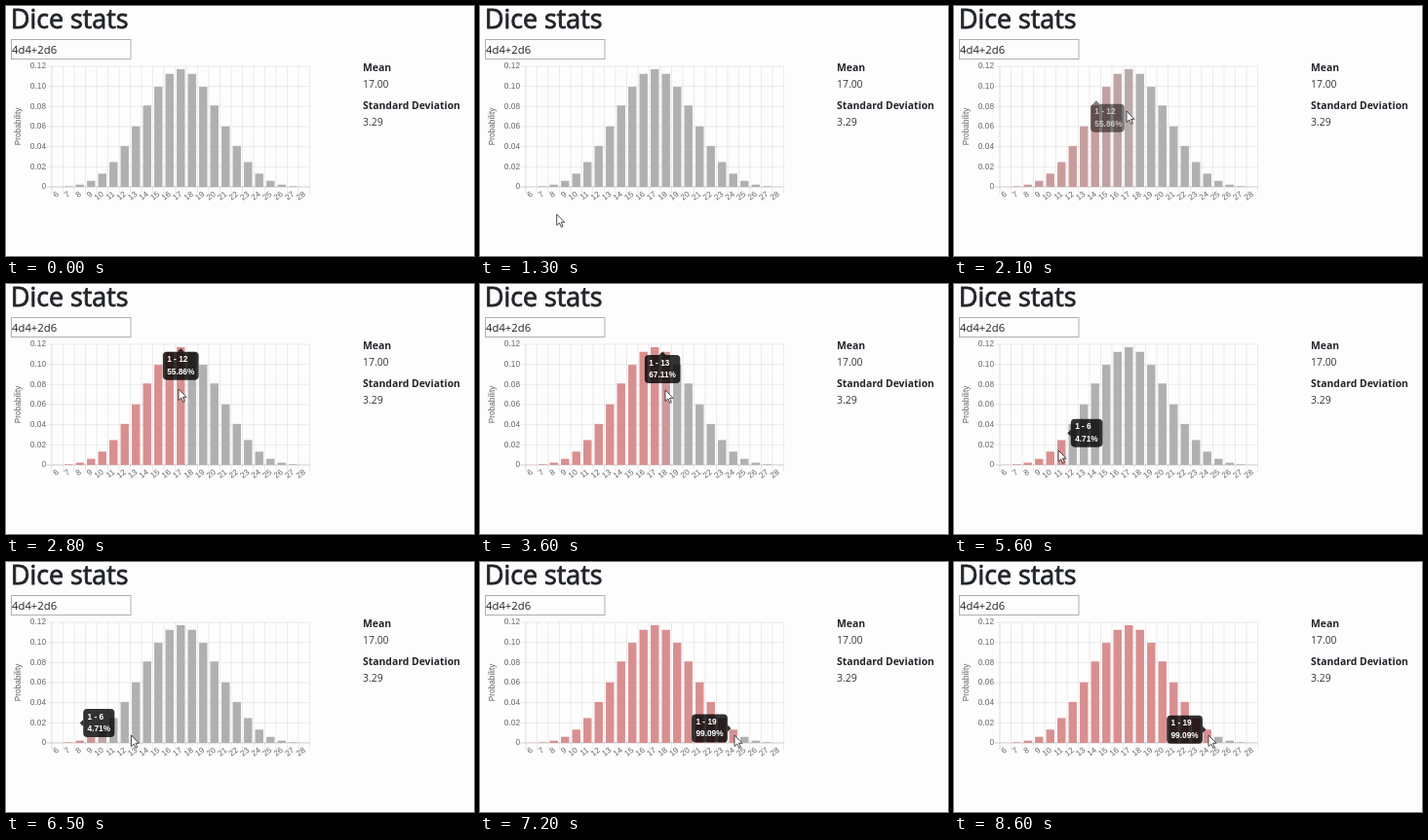
Write an HTML page with a canvas that moves like this. It is 480 px wide and 257 px high and loops after 9.1 s.

```html
<!DOCTYPE html>
<html lang="en">
<head>
<meta charset="utf-8">
<title>Dice stats</title>
<style>
  html, body { margin: 0; width: 100%; height: 100%; overflow: hidden; background: #fefdfe; }
  canvas { display: block; }
</style>
</head>
<body>
<canvas id="stage" width="480" height="257"></canvas>
<script>
const ctx = document.getElementById('stage').getContext('2d');

const LOOP = 9100, TICK = 100, LAST_TICK = 8600;
const HOVER_MS = 400, HOVER_LAG = 70, HOVER_STEP = 20;
const UI = '"Open Sans", "Noto Sans", sans-serif';
const CHART = '"Liberation Sans", Arial, sans-serif';
const LABEL_SIZE = 8.3;

const plot = { left: 47, right: 311.5, top: 62, bottom: 186, max: 0.12 };
const canvasArea = { left: 5, right: 314, top: 56, bottom: 203 };
const tip = { height: 29, pad: 4.3, radius: 4.1, caret: 3.5, gap: 4.8 };

// Probability of every total of 4d4+2d6, from 6 to 28.
const dice = [4, 4, 4, 4, 6, 6];
const probs = dice.reduce((dist, sides) => {
  const next = Array(dist.length + sides - 1).fill(0);
  dist.forEach((p, i) => { for (let k = 0; k < sides; k++) next[i + k] += p / sides; });
  return next;
}, [1]);
const slot = (plot.right - plot.left) / probs.length;
const barX = i => plot.left + (i + 0.5) * slot;
const valueY = v => plot.bottom - v / plot.max * (plot.bottom - plot.top);

// Pointer stops: time, x, y.
const pointerPath = [
  [400, 484, 258], [1000, 80, 214], [1500, 78, 214], [1895, 95, 215],
  [1975, 161, 104], [2000, 176, 107], [2100, 177, 108], [3320, 177, 108],
  [3480, 190, 109], [4300, 190, 109], [4650, 165, 109], [4800, 165, 109],
  [5000, 149, 112], [5600, 107, 171], [5900, 77, 176], [6250, 79, 178],
  [6980, 261, 178]
];

const mix = (a, b, k) => a + (b - a) * k;
const smooth = k => k * k * (3 - 2 * k);
const easeOutQuart = k => 1 - (1 - Math.min(k, 1)) ** 4;

function pointerAt(t) {
  const n = pointerPath.findIndex(p => p[0] > t);
  if (n === 0) return [-50, -50];
  if (n < 0) return pointerPath[pointerPath.length - 1].slice(1);
  const [t0, x0, y0] = pointerPath[n - 1], [t1, x1, y1] = pointerPath[n];
  const k = smooth((t - t0) / (t1 - t0));
  return [mix(x0, x1, k), mix(y0, y1, k)];
}

function hoveredBar(t) {
  const [x, y] = pointerAt(t), a = canvasArea;
  if (x < a.left || x > a.right || y < a.top || y > a.bottom) return -1;
  return Math.max(0, Math.min(probs.length - 1, Math.floor((x - plot.left) / slot)));
}

function tipInfo(i) {
  const sum = probs.slice(0, i + 1).reduce((a, b) => a + b, 0);
  const x = barX(i), y = valueY(probs[i]);
  let side = x <= (canvasArea.left + canvasArea.right) / 2 ? 'left' : 'right';
  if (y < canvasArea.top + tip.height) side = 'top';
  if (y > canvasArea.bottom - tip.height) side = 'bottom';
  return { x, y, side, title: `1 - ${i + 1}`, body: (sum * 100).toFixed(2) + '%' };
}

// Animated values: box x, box y, width, caret x, opacity, then redness per bar.
function hoverTarget(i) {
  const { x, y, side, body } = tipInfo(i);
  ctx.font = `bold ${LABEL_SIZE}px ${CHART}`;
  const w = ctx.measureText(body).width + 2 * tip.pad;
  const boxX = { left: x + tip.gap, right: x - tip.gap - w }[side] ?? x - w / 2;
  const boxY = { top: y + tip.gap, bottom: y - tip.gap - tip.height }[side] ?? y - tip.height / 2;
  return [boxX, boxY, w, x, 1, ...probs.map((_, k) => k <= i ? 1 : 0)];
}

// Each newly hovered bar restarts the transition from the current view;
// bars that drop out of the range turn grey at once.
function hoverAt(t) {
  let active = -1, from = null, to = null, start = 0;
  const view = s => from.map((v, k) => mix(v, to[k], easeOutQuart((s - start) / HOVER_MS)));
  for (let s = 0; s <= t; s += HOVER_STEP) {
    const i = hoveredBar(s - HOVER_LAG);
    if (i < 0 || i === active) continue;
    const target = hoverTarget(i);
    from = from
      ? view(s).map((v, k) => k < 5 ? v : v * target[k])
      : target.map((v, k) => k < 4 ? v : 0);
    to = target;
    active = i;
    start = s;
  }
  return { active, view: from && view(t) };
}

function text(str, x, y, font, color, align = 'left', baseline = 'alphabetic') {
  ctx.font = font;
  ctx.fillStyle = color;
  ctx.textAlign = align;
  ctx.textBaseline = baseline;
  ctx.fillText(str, x, y);
}

function rotatedText(str, x, y, angle, align) {
  ctx.save();
  ctx.translate(x, y);
  ctx.rotate(angle);
  text(str, 0, 0, `${LABEL_SIZE}px ${CHART}`, '#666', align, 'middle');
  ctx.restore();
}

function line(x0, y0, x1, y1, alpha) {
  ctx.strokeStyle = `rgba(0,0,0,${alpha})`;
  ctx.lineWidth = 0.7;
  ctx.beginPath();
  ctx.moveTo(x0, y0);
  ctx.lineTo(x1, y1);
  ctx.stroke();
}

function drawPage() {
  ctx.fillStyle = '#fefdfe';
  ctx.fillRect(0, 0, 480, 257);

  // A thin outline gives the heading its medium weight.
  text('Dice stats', 5, 22.8, `26.8px ${UI}`, '#212529');
  ctx.strokeStyle = '#212529';
  ctx.lineWidth = 0.8;
  ctx.strokeText('Dice stats', 5, 22.8);

  ctx.strokeStyle = '#b0adb4';
  ctx.lineWidth = 1;
  ctx.strokeRect(5.5, 34.5, 122.5, 20);
  text('4d4+2d6', 6, 48.8, `11.3px ${UI}`, '#222');
  [['Mean', '17.00', 67], ['Standard Deviation', '3.29', 106]].forEach(([name, value, y]) => {
    text(name, 366, y, `bold 10.4px ${UI}`, '#212529');
    text(value, 366, y + 17, `10.4px ${UI}`, '#33373b');
  });
}

function drawAxes() {
  for (let k = 0; k <= 6; k++) {
    const v = k * 0.02, y = valueY(v);
    line(41.5, y, plot.right, y, k ? 0.1 : 0.25);
    const label = k === 0 ? '0' : v.toFixed(2);
    text(label, 41, y, `${LABEL_SIZE}px ${CHART}`, '#666', 'right', 'middle');
  }
  for (let k = 0; k <= probs.length; k++) {
    const x = plot.left + k * slot;
    line(x, plot.top, x, plot.bottom + 7, k ? 0.1 : 0.18);
  }
  probs.forEach((_, i) => rotatedText(i + dice.length, barX(i) + 0.5, 192.5, -0.66, 'right'));
  rotatedText('Probability', 12.5, 124, -Math.PI / 2, 'center');
}

function drawBars(redness) {
  const w = slot * 0.73;
  probs.forEach((p, i) => {
    const k = redness ? redness[i] : 0;
    const gb = mix(176, 143, k);
    ctx.fillStyle = `rgb(${mix(177, 217, k)},${gb},${gb})`;
    ctx.fillRect(barX(i) - w / 2, valueY(p), w, plot.bottom - valueY(p));
  });
}

function drawTip(active, [x, y, w, caretX, opacity]) {
  const { side, title, body } = tipInfo(active);
  const { height: h, caret: c } = tip;
  const midY = y + h / 2;
  const carets = {
    left: [[x, midY - c], [x - c, midY], [x, midY + c]],
    right: [[x + w, midY - c], [x + w + c, midY], [x + w, midY + c]],
    top: [[caretX - c, y], [caretX, y - c], [caretX + c, y]],
    bottom: [[caretX - c, y + h], [caretX, y + h + c], [caretX + c, y + h]]
  };
  ctx.save();
  ctx.globalAlpha = opacity;
  ctx.fillStyle = 'rgba(0,0,0,0.8)';
  ctx.beginPath();
  ctx.roundRect(x, y, w, h, tip.radius);
  ctx.fill();
  ctx.beginPath();
  carets[side].forEach(p => ctx.lineTo(...p));
  ctx.fill();
  const font = `bold ${LABEL_SIZE}px ${CHART}`;
  text(title, x + tip.pad, y + 8.3, font, '#fff', 'left', 'middle');
  text(body, x + tip.pad, y + 20.7, font, '#fff', 'left', 'middle');
  ctx.restore();
}

const arrow = new Path2D('M0 0V11.5L2.7 9L4.7 13.3L6.4 12.5L4.5 8.3H8Z');

function drawPointer(x, y) {
  ctx.save();
  ctx.translate(x, y);
  ctx.fillStyle = '#fff';
  ctx.strokeStyle = '#222';
  ctx.lineWidth = 0.8;
  ctx.fill(arrow);
  ctx.stroke(arrow);
  ctx.restore();
}

function draw(t) {
  const { active, view } = hoverAt(t);
  drawPage();
  drawAxes();
  drawBars(view && view.slice(5));
  if (view) drawTip(active, view);
  drawPointer(...pointerAt(t));
}

let shown = -1;
function frame() {
  const t = Math.min(Math.floor(performance.now() % LOOP / TICK) * TICK, LAST_TICK);
  if (t !== shown) draw(shown = t);
  requestAnimationFrame(frame);
}
frame();
</script>
</body>
</html>
```
